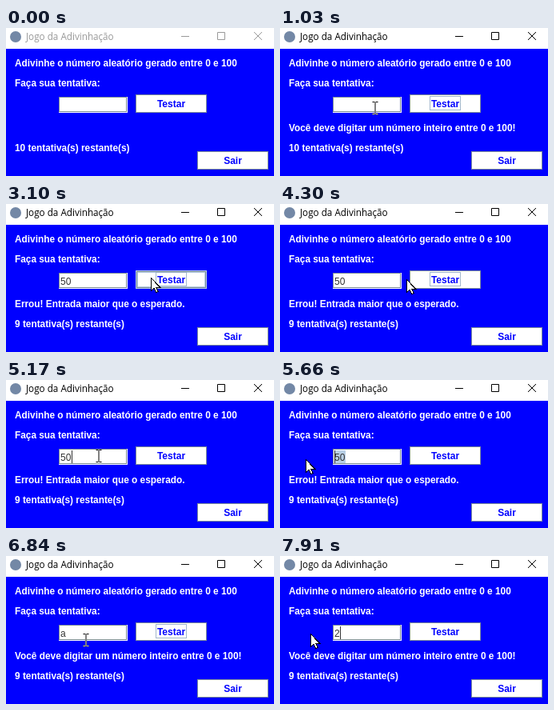
Write an HTML page that moves like this. It is 335 px wide and 185 px high and loops after 8 s.

```html
<!DOCTYPE html>
<html lang="pt">
<head>
<meta charset="utf-8">
<title>Jogo da Adivinhação</title>
<style>
  html, body { margin: 0; width: 100%; height: 100%; overflow: hidden; background: #00f; }
  svg { display: block; width: 100%; height: 100%; }
  text { font: bold 11.85px "Liberation Sans", Arial, sans-serif; fill: #fff; white-space: pre; }
  .title { font: 11.7px "Open Sans", "Noto Sans", sans-serif; fill: #000; }
  .icons { fill: none; stroke: #000; }
  .inactive .title { fill: #999; }
  .inactive .icons { stroke: #999; }
  .entry { font-weight: normal; font-size: 12px; fill: #333; }
  .button text { font-size: 12px; fill: #00f; text-anchor: middle; }
  .face { fill: #fff; stroke: #7a8a99; }
  .glow, .ring { fill: none; stroke: #b8cfe5; visibility: hidden; }
  .glow.dark { stroke: #7a8a99; }
  .ring { stroke: #a3b8cc; }
  .hover .glow, .focus .ring { visibility: visible; }
  .hover .face { stroke: #b8cfe5; }
  .pressed .face { fill: #b8cfe5; stroke: #7a8a99; }
  #arrow { fill: #fff; stroke: #000; shape-rendering: crispEdges; }
  #beam { mix-blend-mode: difference; fill: none; stroke: #fff; }
</style>
</head>
<body>
<svg id="window" viewBox="0 0 335 185">
  <rect width="335" height="185" fill="#00f"/>
  <rect width="335" height="26" fill="#fff"/>
  <circle cx="12" cy="11" r="7" fill="#7388a6"/>
  <text class="title" x="25" y="15">Jogo da Adivinhação</text>
  <path class="icons" d="M219 10.5h10M264.5 5.5h9v9h-9zM310 5l10 10M320 5l-10 10"/>

  <text x="11" y="48">Adivinhe o número aleatório gerado entre 0 e 100</text>
  <text x="11" y="73">Faça sua tentativa:</text>
  <text id="message" x="11" y="129"></text>
  <text id="count" x="11" y="154"></text>

  <rect x="66" y="86" width="86" height="20" fill="#fff"/>
  <rect x="66.5" y="86.5" width="84" height="18" fill="#fff" stroke="#7a8a99"/>
  <rect id="selection" y="88" height="16" fill="#b8cfe5"/>
  <text id="entry" class="entry" x="68" y="101"></text>
  <rect id="caret" y="88" width="1" height="16" fill="#333"/>

  <g id="test" class="button" transform="translate(162 83)">
    <rect class="face" x=".5" y=".5" width="88" height="22"/>
    <rect class="glow dark" x="1.5" y="1.5" width="86" height="20"/>
    <rect class="glow" x="2.5" y="2.5" width="84" height="18"/>
    <rect class="ring" x="25.5" y="2.5" width="38" height="17"/>
    <text x="44.5" y="16">Testar</text>
  </g>
  <g id="exit" class="button" transform="translate(239 154)">
    <rect class="face" x=".5" y=".5" width="88" height="22"/>
    <rect class="glow dark" x="1.5" y="1.5" width="86" height="20"/>
    <rect class="glow" x="2.5" y="2.5" width="84" height="18"/>
    <text x="44.5" y="16">Sair</text>
  </g>

  <path id="arrow" d="M.5 .5v16l3.6-3.4 2.5 5.6 2.5-1.1-2.5-5.4h5z"/>
  <path id="beam" d="M-3.5 -7.5h3M.5 -7.5h3M0 -7v14M-3.5 7.5h3M.5 7.5h3"/>
</svg>
<script>
const LOOP = 8000;
const TEXT_LEFT = 68, CHAR = 7;
const $ = id => document.getElementById(id);
const invalid = "Você deve digitar um número inteiro entre 0 e 100!";
const tooHigh = "Errou! Entrada maior que o esperado.";

// Each user action returns the state it changes from time `at` on
const move = (at, until, x, y) => ({ at, until, to: [x, y] });
const press = at => ({ at, active: true, pressed: true, focus: "test" });
const release = (at, message, tries) => ({ at, pressed: false, message, tries });
const clickField = at => ({ at, focus: "field", blink: at });
const grab = at => ({ ...clickField(at), dragging: true, selecting: true });
const drop = (at, x, y) => ({ ...move(at, at + 1, x, y), dragging: false, blink: at });
const type = (at, entry) => ({ at, entry, selecting: false, blink: at });

const initial = { at: 0, entry: "", message: "", tries: 10 };
const actions = [
  move(70, 400, 203, 96), press(620), release(700, invalid, 10),
  move(710, 1190, 109, 100), clickField(1190), type(1890, "5"), type(2020, "50"),
  move(2480, 2960, 181, 92), press(2820), release(2960, tooHigh, 9),
  move(3960, 4640, 150, 94),
  grab(5100), move(5100, 5590, 24, 98), drop(5650, 32, 99),
  type(5860, "a"), move(5900, 6090, 110, 130), move(6090, 6270, 188, 98),
  press(6270), release(6340, invalid, 9),
  move(6340, 6930, 98, 105), grab(6930), move(6960, 7390, 30, 96), drop(7520, 38, 97),
  type(7780, "2")
];

const easeOut = k => 1 - (1 - k) ** 2;

function pointerAt(done, t) {
  return done.filter(a => a.to).reduce((pos, { at, until, to }) => {
    const k = easeOut(Math.min(1, (t - at) / (until - at)));
    return pos.map((v, i) => v + (to[i] - v) * k);
  }, [266, 177]);
}

const inside = ([x, y], left, top, w, h) => x >= left && x < left + w && y >= top && y < top + h;
const show = (id, on) => $(id).setAttribute("visibility", on ? "visible" : "hidden");
const toggle = (id, name, on) => $(id).classList.toggle(name, !!on);
const setText = (id, value) => { if ($(id).textContent !== value) $(id).textContent = value; };

function draw(t) {
  const done = actions.filter(a => a.at <= t);
  const state = Object.assign({}, initial, ...done);
  const pos = pointerAt(done, t);
  const present = done.length > 0;
  const over = (...box) => present && !state.dragging && inside(pos, ...box);

  toggle("window", "inactive", !state.active);
  setText("message", state.message);
  setText("count", state.tries + " tentativa(s) restante(s)");
  setText("entry", state.entry);

  toggle("test", "hover", over(162, 83, 89, 23));
  toggle("test", "focus", state.focus === "test");
  toggle("test", "pressed", state.pressed);
  toggle("exit", "hover", over(239, 154, 89, 23));

  // A leftward drag selects from the end of the entry back to the pointer
  const end = state.entry.length;
  const column = Math.round((pos[0] - TEXT_LEFT) / CHAR);
  const caret = state.selecting ? Math.min(end, Math.max(0, column)) : end;
  const caretX = TEXT_LEFT + caret * CHAR;
  $("selection").setAttribute("x", caretX);
  $("selection").setAttribute("width", (end - caret) * CHAR);
  $("caret").setAttribute("x", caretX);
  show("caret", state.focus === "field" && (t - state.blink) % 1000 < 500);

  const beam = state.dragging || over(66, 86, 86, 20);
  show("beam", present && beam);
  show("arrow", present && !beam);
  const place = `translate(${pos.map(Math.round)})`;
  $("arrow").setAttribute("transform", place);
  $("beam").setAttribute("transform", place);
}

const start = performance.now();
function tick() {
  draw((performance.now() - start) % LOOP);
  requestAnimationFrame(tick);
}
tick();
</script>
</body>
</html>
```
